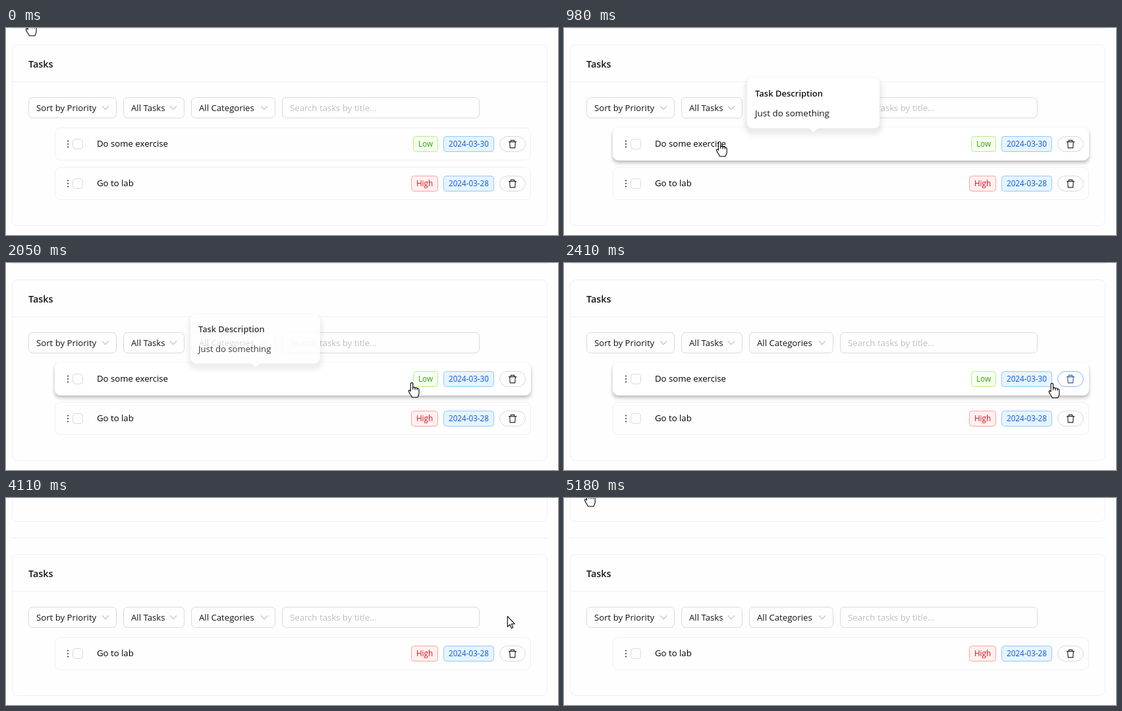
Recreate the animation shown at these times as an HTML page. Size 838 by 314 pixels, loop 5270 ms.

```html
<!DOCTYPE html>
<html lang="en">
<head>
<meta charset="utf-8">
<title>Tasks</title>
<style>
html, body { margin: 0; width: 100%; height: 100%; overflow: hidden; background: #fefefe; }
svg { display: block; }
text { font: 13.2px "Open Sans", "Noto Sans", sans-serif; fill: #141414; }
.title { font-size: 14.4px; font-weight: 600; }
.head { font-size: 13px; font-weight: 600; }
.body { font-size: 13.45px; }
.task { fill: #000; }
.hint { fill: #bfbfbf; }
.line { fill: none; stroke: #f0f0f0; }
.card { fill: #fefefe; stroke: #f0f0f0; }
.field { fill: #fefefe; stroke: #d9d9d9; }
.icon { fill: none; stroke: #262626; stroke-width: 1.15; }
.chevron { fill: none; stroke: #bfbfbf; stroke-width: 1.1; }
.cursor path { fill: #fff; stroke: #000; stroke-width: 1.1; stroke-linejoin: round; }
</style>
</head>
<body>
<svg id="stage" width="838" height="314" viewBox="0 0 838 314"></svg>
<script>
const LOOP = 5270;
const FRAME = 89.46;
const REMOVED = 3390;
// pointer stops: time, x, y
const PATH = [
  [180, 34.8, -11], [626, 226, 165], [805, 236, 172],
  [1342, 236, 172], [1700, 478, 196], [2058, 616, 181], [2505, 772, 182],
  [4026, 772, 182], [4115, 761, 179], [4562, 206, 66], [5100, 36, -10]
];

const rect = (x, y, w, h, r, attrs) =>
  `<rect x="${x}" y="${y}" width="${w}" height="${h}" rx="${r}" ${attrs}/>`;
// 1px bordered box given by its outer edges
const box = (x, y, w, h, r, attrs) => rect(x + .5, y + .5, w - 1, h - 1, r, attrs);
const text = (x, y, s, attrs = "") => `<text x="${x}" y="${y}" ${attrs}>${s}</text>`;

const shadow = (x, y, w, h, dy, blur, spread, alpha) =>
  rect(x - spread, y + dy - spread, w + 2 * spread, h + 2 * spread, 8 + spread,
    `fill="#000" fill-opacity="${alpha}" style="filter:blur(${blur / 2}px)"`);

const select = (x, w, label) => box(x, 165, w, 32, 6, 'class="field"') +
  text(x + 12, 186, label) +
  `<path class="chevron" d="M${x + w - 22} 178.3l5 5.4 5-5.4"/>`;

const tag = (x, w, label, fill, stroke, ink) =>
  box(x, 164, w, 24, 4, `fill="${fill}" stroke="${stroke}"`) +
  text(x + w / 2, 180, label, `text-anchor="middle" style="font-size:11.7px;fill:${ink}"`);

const trash = id => `<g id="${id}">` + box(749, 164, 40, 24, 12, 'class="field"') +
  `<path class="icon" d="M763 172.6h12M766.4 172.4v-2h5.2v2M764.7 173l.6 8.8h7.4l.6-8.8"/></g>`;

const row = (label, mark, date, id) =>
  box(74, 151, 723, 50, 8, `class="card" id="${id}Edge"`) +
  [-1, 0, 1].map(k => `<circle cx="94" cy="${176 + 4.5 * k}" r="1" fill="#262626"/>`).join("") +
  box(101, 168, 16, 16, 4, 'class="field"') +
  text(138, 180, label, 'class="task"') + mark +
  tag(664, 77, date, "#e6f4ff", "#91caff", "#0958d9") + trash(id + "Bin");

const low = tag(618, 38, "Low", "#f6ffed", "#b7eb8f", "#389e0d");
const high = tag(615, 41, "High", "#fff1f0", "#ffa39e", "#cf1322");

document.getElementById("stage").innerHTML =
  rect(9.5, 85.5, 812, 214, 8, 'class="card" id="panel"') +
  `<g id="top">
    <rect class="card" x="9.5" y="-40" width="812" height="75.5" rx="8"/>
    <path class="line" d="M9 60.5H822M10 141.5H821"/>` +
    text(34, 120, "Tasks", 'class="title"') +
    select(34, 134, "Sort by Priority") + select(178, 93, "All Tasks") +
    select(281, 128, "All Categories") +
    box(419, 165, 300, 32, 6, 'class="field"') +
    text(431, 186, "Search tasks by title...", 'class="hint"') +
  `</g>
  <g transform="translate(0 60)">${row("Go to lab", high, "2024-03-28", "second")}</g>
  <g id="first"><g id="lift">` +
    shadow(74, 151, 723, 50, 4, 4, 2, .07) +
    shadow(74, 151, 723, 50, 3, 5, -1, .24) +
  `</g>${row("Do some exercise", low, "2024-03-30", "first")}</g>
  <g id="pop">` +
    shadow(278, 76, 201, 76, 6, 6, 4, .08) +
    rect(278, 76, 201, 76, 8, 'fill="#fff"') +
    '<path fill="#fff" d="M370 152q2.5 0 4 1.8l3 3.2q1.5 1.3 3 0l3-3.2q1.5-1.8 4-1.8z"/>' +
    text(290, 104, "Task Description", 'class="head"') +
    text(290, 134, "Just do something", 'class="body"') +
  `</g>
  <g class="cursor" id="cursor">
    <path id="arrow" d="M.5.5V16.4L4.2 12.9 6.6 18.5 9 17.4 6.6 12H11.4Z"/>
    <g id="hand">
      <path d="M-1.6 1.9a1.75 1.75 0 0 1 3.4 0V8.2c.5-1.2 3-1.2 3.3.4.8-1 3-.8 3.2.8 1-.6 2.9 0 2.9 2v4.8c0 3-1.6 3.8-2 6.5H.4c-.6-2.8-3.8-5.5-4.8-8.8-.6-2 1.4-2.6 2.8-.6Z"/>
      <path style="fill:none" d="M1.8 8V11M5.1 8.6V11.4M8.3 9.4V11.8"/>
    </g>
  </g>`;

const el = id => document.getElementById(id);
const ramp = (t, a, b) => Math.min(1, Math.max(0, (t - a) / (b - a)));
const show = (id, on) => el(id).setAttribute("visibility", on ? "visible" : "hidden");

function pointer(t) {
  const i = Math.max(1, PATH.findIndex(p => p[0] > t));
  const last = t >= PATH.at(-1)[0];
  const [t0, x0, y0] = PATH[last ? PATH.length - 2 : i - 1];
  const [t1, x1, y1] = last ? PATH.at(-1) : PATH[i];
  const k = ramp(t, t0, t1);
  return [x0 + (x1 - x0) * k, y0 + (y1 - y0) * k];
}

function isLink(x, y, full) {
  if (y < 0) return true;
  const onRow = x > 74 && x < 797 && y > 151 && y < 201;
  const onSelect = x > 34 && x < 168 && y > 105 && y < 137;
  return full && (onRow || onSelect);
}

function draw(time) {
  // hold each picture; frame starts are rounded down to 10 ms
  const t = Math.floor((time + 10) / FRAME) * FRAME;
  const full = t < REMOVED;

  el("top").setAttribute("transform", `translate(0 ${full ? -60 : 0})`);
  el("panel").setAttribute("y", full ? 25.5 : 85.5);
  el("panel").setAttribute("height", full ? 274 : 214);
  el("first").style.display = full ? "" : "none";

  const lift = ramp(t, 440, 620);
  el("lift").setAttribute("opacity", lift);
  el("firstEdge").style.strokeOpacity = 1 - lift;
  el("firstEdge").style.fill = lift ? "#fff" : "";
  // the border turns into plain white once the row is raised
  if (lift === 1) {
    el("firstEdge").style.stroke = "#fff";
    el("firstEdge").style.strokeOpacity = 1;
  } else el("firstEdge").style.stroke = "";

  const blue = ramp(t, 2320, 2500);
  const mix = (from, to) => `rgb(${from.map((v, i) => Math.round(v + (to[i] - v) * blue))})`;
  const [edge, icon] = el("firstBin").children;
  edge.style.stroke = mix([217, 217, 217], [64, 150, 255]);
  icon.style.stroke = mix([38, 38, 38], [64, 150, 255]);

  const open = ramp(t, 690, 870) * (1 - ramp(t, 2042, 2142));
  const s = .85 + .15 * open;
  el("pop").setAttribute("opacity", open);
  el("pop").setAttribute("transform", `translate(378.5 158) scale(${s}) translate(-378.5 -158)`);

  const [x, y] = pointer(t);
  const link = isLink(x, y, full);
  el("cursor").setAttribute("transform", `translate(${x} ${y})`);
  show("hand", link);
  show("arrow", !link);
}

const start = performance.now();
function tick() {
  draw((performance.now() - start) % LOOP);
  requestAnimationFrame(tick);
}
tick();
</script>
</body>
</html>
```
